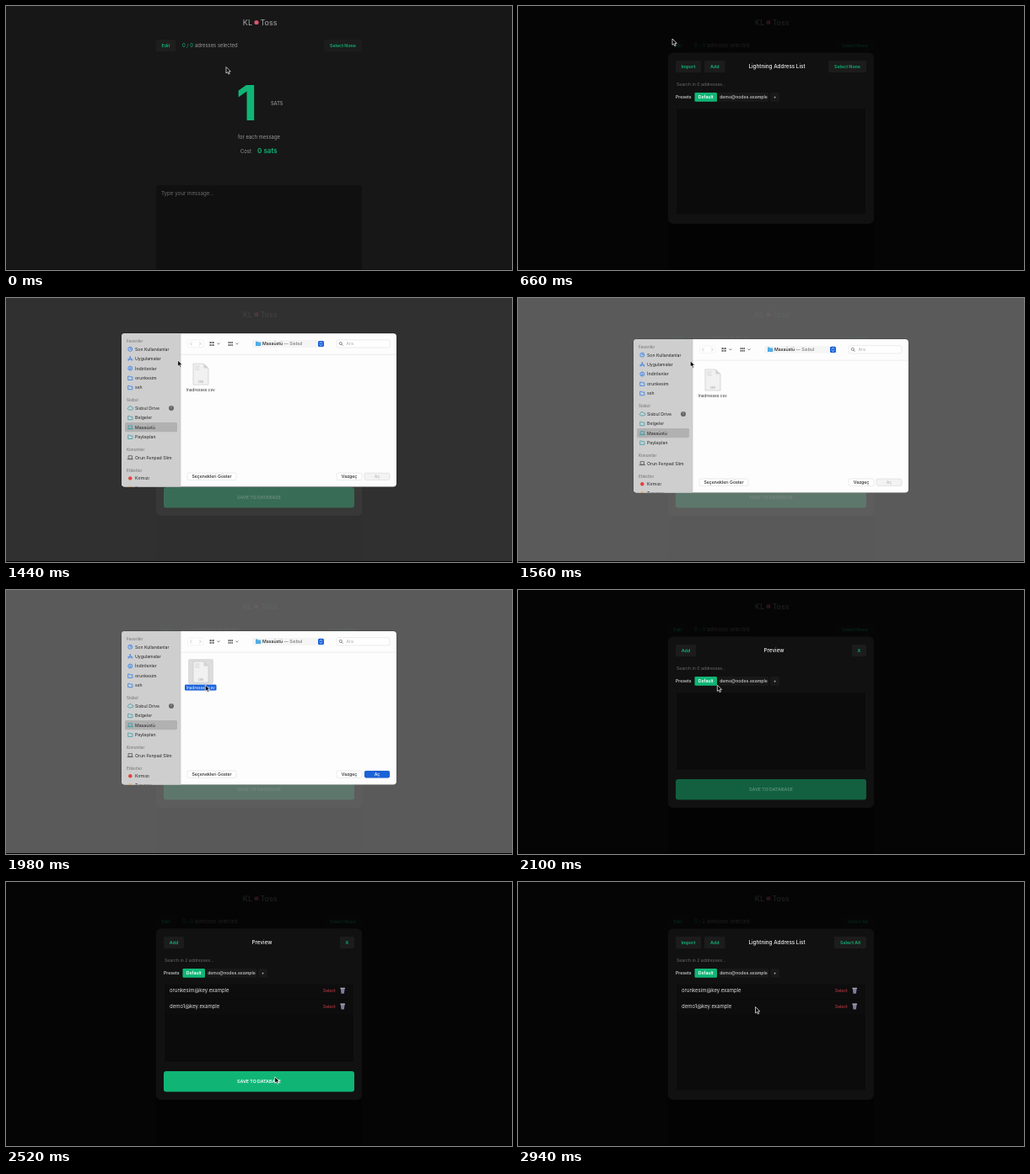
Recreate the animation shown at these times as an HTML page. Size 600 by 314 pixels, loop 3 s.

```html
<!DOCTYPE html>
<html lang="en">
<head>
<meta charset="utf-8">
<title>Address import</title>
<style>
  html, body { margin: 0; width: 100%; height: 100%; overflow: hidden; background: #171717; }
  svg { display: block; width: 100vw; height: 100vh; font-family: Inter, sans-serif; }
  text { white-space: pre; }
</style>
</head>
<body>
<svg id="stage" viewBox="0 0 600 314"></svg>
<script>
const LOOP = 3000;
const GREEN = '#10b576', BLUE = '#1a62d9', SKY = '#2f7de6', TEAL = '#3a9ea6';
const stage = document.getElementById('stage');

const clamp = v => Math.max(0, Math.min(1, v));
const ramp = (t, a, b) => clamp((t - a) / (b - a));
const smooth = v => v * v * (3 - 2 * v);

const rect = (x, y, w, h, fill, r = 0, extra = '') =>
  `<rect x="${x}" y="${y}" width="${w}" height="${h}" rx="${r}" fill="${fill}" ${extra}/>`;
const circle = (x, y, r, fill, extra = '') =>
  `<circle cx="${x}" cy="${y}" r="${r}" fill="${fill}" ${extra}/>`;
const line = (d, color, width = 0.8) =>
  `<path d="${d}" fill="none" stroke="${color}" stroke-width="${width}" stroke-linecap="round" stroke-linejoin="round"/>`;
const text = (x, y, str, size, fill, weight = 400, anchor = 'start') =>
  `<text x="${x}" y="${y}" font-size="${size}" fill="${fill}" font-weight="${weight}" text-anchor="${anchor}">${str}</text>`;
const group = (opacity, body, dy = 0) =>
  opacity > 0 ? `<g opacity="${opacity}" transform="translate(0 ${dy})">${body}</g>` : '';
const button = (x, y, w, h, label, fill = '#1c1c1c', color = GREEN, size = 5.3, r = 1.2) =>
  rect(x, y, w, h, fill, r) + text(x + w / 2, y + h / 2 + size * 0.36, label, size, color, 600, 'middle');

const selectButton = (y, right, count) =>
  count ? button(right - 38, y, 38, 14, 'Select All') : button(right - 45, y, 45, 14, 'Select None');

function page(count) {
  return rect(0, 0, 600, 314, '#171717') +
    text(292, 23, 'KL', 9, '#aaa', 400, 'end') + circle(297, 19.5, 2.6, '#d9586c') +
    text(301.5, 23, 'Toss', 9, '#aaa') +
    button(178, 40, 23, 14, 'Edit', '#1e1e1e') +
    text(209, 49.3, `0 / ${count}`, 5.9, GREEN) +
    text(224, 49.3, 'adresses selected', 5.9, '#999') +
    selectButton(40, 422, count) +
    text(273, 136, '1', 58, GREEN, 700) +
    text(314, 118, 'SATS', 5.6, '#888', 600) +
    text(300, 157.7, 'for each message', 5.9, '#999', 400, 'middle') +
    text(278, 175, 'Cost', 5.9, '#999') +
    text(298, 175.3, '0 sats', 8.1, GREEN, 600) +
    rect(178, 213, 244, 110, '#101010', 3) +
    text(184, 225, 'Type your message...', 6.2, '#6b6b6b') +
    rect(0, 313, 600, 1, '#110b0b');
}

function trash(x, y) {
  return `<path d="M${x - 2.4} ${y - 2.2}h4.8l-.7 5.6h-3.4z" fill="#817b9c"/>` +
    rect(x - 2.9, y - 3.6, 5.8, 1.4, '#aaa4bd', 0.6);
}

const rows = () => ['orunkesim@key.example', 'demo1@key.example'].map((address, i) => {
  const y = 129.3 + i * 18.8;
  return rect(188, y - 8, 224, 17.5, '#0d0d0d') +
    text(194, y + 2, address, 6, '#ddd') +
    text(376, y + 1.9, 'Select', 5, '#d9414d') + trash(399.2, y);
}).join('');

function panel(title, titleX, count, listHeight) {
  return rect(178, 55.5, 244, 203.5, '#111', 6) +
    text(titleX, 74.2, title, 6.3, '#eee', 500, 'middle') +
    text(188, 94.5, `Search in ${count} addresses...`, 5.15, '#6b6b6b') +
    text(187, 110, 'Presets', 5.15, '#ddd', 500) +
    button(209.5, 103, 26.5, 10.7, 'Default', GREEN, '#fff', 5.1) +
    button(238, 103, 59, 10.7, 'demo@nodes.example', '#191919', '#bbb', 5.1) +
    button(299.5, 103, 10.5, 10.7, '+', '#191919', '#bbb', 5.1) +
    rect(187.5, 121.5, 225, listHeight, '#0b0b0b', 1, 'stroke="#161616" stroke-width=".7"') +
    (count ? rows() : '');
}

const addressList = count =>
  panel('Lightning Address List', 307, count, 126.5) +
  button(187, 65, 30, 14, 'Import') + button(221, 65, 24.5, 14, 'Add') +
  selectButton(65, 413, count);

const preview = (count, addHover) =>
  panel('Preview', 303.5, count, 93) +
  button(187, 65, 24, 14, 'Add', addHover ? '#242424' : '#1c1c1c') +
  button(396, 65, 17, 14, 'X') +
  button(187, 225, 226, 24.5, 'SAVE TO DATABASE',
    count ? GREEN : '#12603f', count ? '#fff' : '#5c8f79', 5.3, 3);

const folder = (x, y, color) =>
  line(`M${x - 2.6} ${y + 2}v-4h2l.7.8h2.5v3.2z`, color);
const laptop = (x, y, color) =>
  line(`M${x - 2.2} ${y + 1}v-3h4.4v3zM${x - 3.2} ${y + 2}h6.4`, color);
const cloud = (x, y, color) =>
  line(`M${x - 2} ${y + 1.8}a1.5 1.5 0 0 1 0-2.8a2 2 0 0 1 3.8-.2a1.5 1.5 0 0 1 .4 3z`, color);
const disc = (x, y, color, mark) =>
  circle(x, y, 2.5, 'none', `stroke="${color}" stroke-width=".8"`) + line(`M${x} ${y}${mark}`, color, 0.7);
const clock = (x, y, color) => disc(x, y, color, 'v-1.5m0 1.5h1.2');
const download = (x, y, color) => disc(x, y, color, 'm0-1.3v2.6m-1-1l1 1l1-1');
const apps = (x, y, color) =>
  line(`M${x - 2} ${y + 2.3}l2.2-4.6M${x + 2} ${y + 2.3}l-2.2-4.6M${x - 2.7} ${y + 0.9}h5.4`, color);
const tag = (x, y, color) => circle(x, y, 2.2, color);

const sidebar = [
  [60, 'Favoriler'],
  [67.7, 'Son Kullanılanlar', clock, SKY], [79, 'Uygulamalar', apps, SKY],
  [90.5, 'İndirilenler', download, SKY], [102, 'orunkesim', folder, SKY], [113.3, 'ssh', folder, SKY],
  [130, 'Sisbul'],
  [138, 'Sisbul Drive', cloud, TEAL], [149.3, 'Belgeler', folder, TEAL],
  [160.7, 'Masaüstü', laptop, TEAL], [172, 'Paylaşılan', folder, TEAL],
  [189, 'Konumlar'],
  [196.6, 'Orun Fenpad Slim', laptop, '#555'],
  [213.5, 'Etiketler'],
  [221.3, 'Kırmızı', tag, '#e0443e'], [232.5, 'Turuncu', tag, '#f09a37']
];

function sidebarItem([y, label, icon, color]) {
  return icon
    ? icon(147.3, y, color) + text(153, y + 1.9, label, 5.2, '#222')
    : text(143, y, label, 4.6, '#858585', 600);
}

const chevron = (x, y) => line(`M${x - 1.2} ${y - 0.6}l1.2 1.2l1.2-1.2`, '#555', 0.7);

function tiles(x, y, columns) {
  let out = '';
  for (let i = 0; i < columns * 2; i++)
    out += rect(x + (i % columns) * (6 / columns), y + Math.floor(i / columns) * 2.8,
      4.4 / columns, 2, '#666', 0.3);
  return out;
}

const pushButton = (x, w, label, fill, color) =>
  rect(x, 215, w, 8.4, fill, 1.8, 'stroke="#000" stroke-opacity=".16" stroke-width=".5"') +
  text(x + w / 2, 221.1, label, 5.2, color, 500, 'middle');

function fileIcon(selected) {
  return (selected ? rect(216, 82, 30, 30, '#dcdcdc', 2) : '') +
    `<path d="M222 85h12.5l5.5 5.5v19.5h-18z" fill="#f1f1f1" stroke="#c4c4c4" stroke-width=".6"/>` +
    `<path d="M234.5 85v5.5h5.5z" fill="#d2d2d2"/>` +
    line('M224.5 88h5M224.5 90h4M224.5 92h5', '#ccc', 0.6) +
    text(231, 107.5, 'CSV', 3, '#999', 500, 'middle') +
    (selected ? rect(212, 112.6, 37.5, 7, BLUE, 1.4) : '') +
    text(230.8, 117.9, 'lnadresses.csv', 4.8, selected ? '#fff' : '#333', 400, 'middle');
}

function fileDialog(selected) {
  return rect(136.5, 48.5, 327, 183.5, '#000', 4.5, 'opacity=".25"') +
    `<clipPath id="sheet">${rect(137, 49, 326, 182.5, '#fff', 4)}</clipPath><g clip-path="url(#sheet)">` +
    rect(137, 49, 326, 183, '#fdfdfd') + rect(137, 49, 70, 183, '#cecece') +
    rect(141, 155, 62, 11.2, '#b1b1b1', 1.6) +
    sidebar.map(sidebarItem).join('') +
    circle(196, 138, 3, '#666') + line('M196 138v-2.4', '#ccc', 0.5) +
    rect(207, 73.8, 256, 0.6, '#e0e0e0') + rect(206.8, 49, 0.5, 183, '#bdbdbd') +
    rect(215.5, 57, 18.5, 8.6, '#fff', 1.8, 'stroke="#e6e6e6" stroke-width=".5"') +
    line('M220 59.6l-1.5 1.7l1.5 1.7M229.5 59.6l1.5 1.7l-1.5 1.7', '#b5b5b5', 0.7) +
    tiles(241.5, 59, 2) + chevron(252, 61.4) + tiles(263.5, 59, 3) + chevron(274, 61.4) +
    rect(292, 57, 86, 8.8, '#f5f5f5', 1.8) +
    `<path d="M296 64v-5.4h2.3l.7.8h3.3v4.6z" fill="#50ade6"/>` +
    text(304, 63.2, 'Masaüstü <tspan fill="#777">— Sisbul</tspan>', 5.2, '#222', 500) +
    rect(370, 57.8, 7, 7.2, BLUE, 1.6) +
    line('M372.2 60.6l1.3-1.3l1.3 1.3M372.2 62.3l1.3 1.3l1.3-1.3', '#fff', 0.7) +
    rect(392, 56.7, 63, 9.2, '#fff', 2, 'stroke="#dedede" stroke-width=".6"') +
    circle(396.8, 60.9, 1.6, 'none', 'stroke="#666" stroke-width=".7"') + line('M398 62.1l1.4 1.4', '#666', 0.7) +
    text(403.5, 63.2, 'Ara', 5.2, '#aaa') +
    fileIcon(selected) +
    pushButton(215, 58, 'Seçenekleri Göster', '#fff', '#222') +
    pushButton(392, 30, 'Vazgeç', '#fff', '#222') +
    pushButton(425, 30, 'Aç', selected ? BLUE : '#f3f3f3', selected ? '#fff' : '#bbb') + '</g>';
}

// time, x, y of the pointer tip
const pointerPath = [
  [150, 261, 72.5], [300, 183, 39], [670, 183, 39], [920, 203.7, 74], [1540, 203.7, 74],
  [1800, 236.3, 113], [2250, 236.3, 113], [2550, 321, 235], [2930, 321, 235], [2931, 281.5, 148.5]
];

function pointer(t) {
  const next = pointerPath.findIndex(p => p[0] > t);
  const b = pointerPath[next < 0 ? pointerPath.length - 1 : next];
  const a = next > 0 ? pointerPath[next - 1] : b;
  const k = a === b ? 0 : smooth(ramp(t, a[0], b[0]));
  const x = a[1] + (b[1] - a[1]) * k, y = a[2] + (b[2] - a[2]) * k;
  return `<path d="M${x} ${y}v7.4l1.7-1.5l1.2 2.7l1.3-.6l-1.2-2.6h2.3z" fill="#000" stroke="#fff" stroke-width=".7"/>`;
}

function draw(t) {
  const open = ramp(t, 440, 600);
  const previewShown = ramp(t, 1020, 1140) * (1 - ramp(t, 2640, 2760));
  const sheetOpen = ramp(t, 1380, 1500);
  const sheetShown = 1 - ramp(t, 1985, 2100);
  const saved = t >= 2640 ? 2 : 0;
  const loaded = t >= 2200 ? 2 : 0;

  stage.innerHTML = page(saved) +
    group(open, rect(0, 0, 600, 314, '#000', 0, 'opacity=".8"')) +
    group(open, addressList(saved)) +
    group(previewShown, preview(loaded, t >= 1140 && t < 1560)) +
    group(0.68 * sheetOpen * sheetShown, rect(0, 0, 600, 313, '#828282')) +
    group(clamp(sheetOpen * 2) * sheetShown, fileDialog(t >= 1830), -14 * (1 - sheetOpen)) +
    pointer(t);
}

function frame() {
  draw(performance.now() % LOOP);
  requestAnimationFrame(frame);
}
frame();
</script>
</body>
</html>
```
